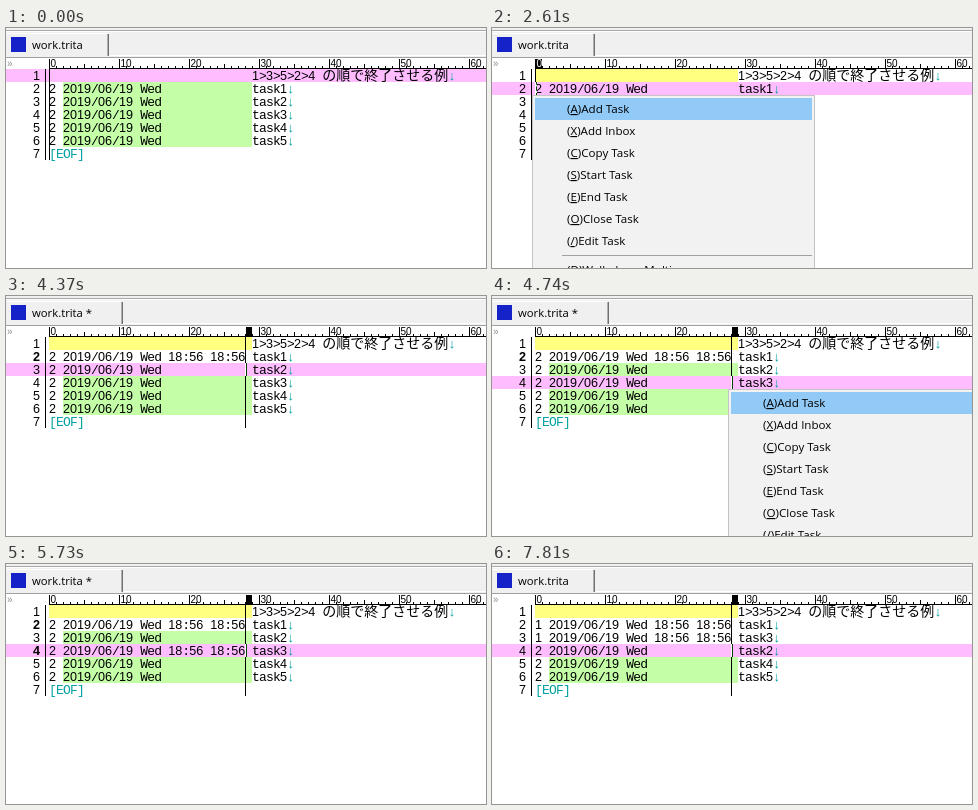
Write an HTML page that moves like this. It is 480 px wide and 240 px high and loops after 8 s.

```html
<!DOCTYPE html>
<html lang="ja">
<head>
<meta charset="utf-8">
<title>work.trita</title>
<style>
html, body { margin: 0; width: 100%; height: 100%; overflow: hidden; background: #fff; }
svg { display: block; width: 480px; height: 240px; }
rect, path { shape-rendering: crispEdges; }
text { white-space: pre; }
.cell { font: 13px "Liberation Mono", monospace; letter-spacing: -0.8px; }
.num { font-family: "Liberation Sans", sans-serif; font-size: 12.6px; letter-spacing: 0; }
.wide { font-family: "Noto Sans CJK JP", "Noto Sans CJK", sans-serif; font-size: 14px; letter-spacing: 0; }
.bold { font-weight: bold; }
.mark { fill: #00a0a0; }
.ui { font: 11.6px "Open Sans", sans-serif; }
.tab { font-size: 11.3px; }
.rule { font: 10px "Liberation Sans", sans-serif; }
.key { text-decoration: underline; }
.caret { mix-blend-mode: difference; }
</style>
</head>
<body>
<svg id="stage" viewBox="0 0 480 240"></svg>
<script>
const LOOP = 8000, LEFT = 43, CELL = 7, TOP = 41, ROW = 13;
const PINK = '#ffbcff', GREEN = '#c4ffa8', YELLOW = '#ffff80';

// task: [name, state, number of times noted]
const task = (id, state = 2, times = 0) => ['task' + id, state, times];
const tasks = (a, b) => [task(1, 2, a), task(2), task(3, 2, b), task(4), task(5)];
const docs = [
  { tasks: tasks(0, 0), edited: [] },
  { tasks: tasks(1, 0), edited: [2] },
  { tasks: tasks(2, 0), edited: [2] },
  { tasks: tasks(2, 1), edited: [2, 4] },
  { tasks: tasks(2, 2), edited: [2, 4] },
  { tasks: [task(1, 1, 2), task(3, 1, 2), task(2), task(4), task(5)], edited: [] }
];

// time, document, row, column
const poses = [
  [0, 0, 1, 0],
  [2360, 0, 2, 0],
  [2980, 1, 2, 22],
  [3870, 2, 2, 28],
  [4370, 2, 3, 28],
  [4490, 2, 4, 28],
  [5110, 3, 4, 22],
  [5730, 4, 4, 28],
  [6750, 5, 4, 28]
];
const FOCUS = 370;
const menuOpen = [[2610, 2860], [3380, 3750], [4740, 4990], [5360, 5730], [6260, 6630]];
const caretOff = [[0, FOCUS], [990, 1490], [1990, 2360], [7310, 7810]];
const within = (spans, t) => spans.some(([a, b]) => t >= a && t < b);

const menuItems = ['A Add Task', 'X Add Inbox', 'C Copy Task', 'S Start Task', 'E End Task',
  'O Close Task', '/ Edit Task', '', 'D Walk down Multi...'];

const esc = s => s.replace(/&/g, '&amp;').replace(/>/g, '&gt;').replace(/</g, '&lt;');
const rect = (x, y, w, h, fill, more = '') =>
  `<rect x="${x}" y="${y}" width="${w}" height="${h}" fill="${fill}" ${more}/>`;
const label = (x, y, body, cls, fill = '#000') =>
  `<text x="${x}" y="${y}" class="${cls}" fill="${fill}">${body}</text>`;
const colX = c => LEFT + c * CELL;
const rowY = r => TOP + (r - 1) * ROW;

// editor text: digits, wide characters and line ends have their own style
function cells(x, row, str, cls = '') {
  const body = str.replace(/\d+|[\u3040-\u9fff]+|↓|[^\d\u3040-\u9fff↓]+/g, s => {
    const kind = /\d/.test(s) ? 'num' : s === '↓' ? 'mark' : /[\u3040-\u9fff]/.test(s) ? 'wide' : '';
    return kind ? `<tspan class="${kind}">${s}</tspan>` : esc(s);
  });
  return label(x, rowY(row) + 11, body, 'cell ' + cls);
}

function header(edited) {
  const w = edited ? 117 : 103;
  return rect(0, 0, 480, 31, '#f0f0f0')
    + rect(0, 2, 480, 1, '#a8a8a8') + rect(0, 3, 480, 1, '#fff')
    + rect(w, 27, 480 - w, 1, '#fff') + rect(0, 29, 480, 1, '#a0a0a0') + rect(0, 30, 480, 1, '#fff')
    + rect(0, 5, w - 1, 1, '#fff') + rect(w - 1, 6, 1, 22, '#707070') + rect(w - 2, 6, 1, 22, '#b0b0b0')
    + rect(5, 9, 15, 15, '#1522c8')
    + label(26, 21, 'work.trita' + (edited ? ' *' : ''), 'ui tab');
}

function ruler(col, marker) {
  let ticks = '', out = label(1, 39, '»', 'rule', '#909090');
  for (let c = 0; colX(c) < 480; c++) {
    const h = c % 10 === 0 ? 10 : c % 5 === 0 ? 5 : 3;
    ticks += `M${colX(c) + 0.5} 41v-${h}`;
    if (c % 10 === 0) out += label(colX(c) + 1.5, 39, c, 'rule');
  }
  out += `<path d="${ticks}" stroke="#000"/>` + rect(LEFT, 40, 480 - LEFT, 1, '#000');
  if (!marker) return out;
  const x = colX(col);
  if (col === 0) return out + rect(x, 31, 7, 10, '#000') + label(x + 1.5, 39, '0', 'rule', '#fff');
  return out + rect(x + 1, 31, 6, 10, '#000') + rect(x, 38, 8, 3, '#000');
}

function editor(doc, row, col, caret) {
  let back = rect(LEFT, rowY(1), 29 * CELL, ROW, YELLOW);
  let text = cells(colX(29), 1, '1>3>5>2>4 の順で終了させる例↓');
  doc.tasks.forEach(([name, state, times], i) => {
    const r = i + 2, cls = times === 1 ? 'bold' : '';
    if (times < 2) back += rect(colX(2), rowY(r), 27 * CELL, ROW, GREEN);
    text += cells(LEFT, r, `${state} 2019/06/19 Wed` + ' 18:56'.repeat(times), cls)
      + cells(colX(29), r, name + '↓', cls);
  });
  text += cells(LEFT, 7, '[EOF]', 'mark');
  for (let r = 1; r <= 7; r++) text += cells(27, r, String(r), doc.edited.includes(r) ? 'bold' : '');
  back += rect(0, rowY(row), 480, ROW, PINK);
  return back + text + rect(39, TOP, 1, 7 * ROW, '#000') + rect(colX(col), TOP, 1, 7 * ROW, '#000')
    + (caret ? rect(colX(col), rowY(row), 2, ROW, '#fff', 'class="caret"') : '');
}

function menu(row, col) {
  const x = colX(col) - 3, top = rowY(row + 1);
  let y = top + 3;
  let out = rect(x, top, 283, 240, '#c4c4c4') + rect(x + 1, top + 1, 281, 240, '#f2f2f2')
    + rect(x + 3, y, 277, 22, '#91c9f7');
  for (const item of menuItems) {
    if (item) {
      out += label(x + 35, y + 15, `(<tspan class="key">${item[0]}</tspan>)${item.slice(2)}`, 'ui');
      y += 22;
    } else {
      out += rect(x + 30, y + 3, 250, 1, '#a0a0a0');
      y += 7;
    }
  }
  return out;
}

const stage = document.getElementById('stage');
const start = performance.now();
let shown = '';

function draw() {
  const t = (performance.now() - start) % LOOP;
  const [, d, row, col] = poses.findLast(p => p[0] <= t);
  const open = within(menuOpen, t), caret = !within(caretOff, t), marker = t >= FOCUS;
  const key = [d, row, col, open, caret, marker].join();
  if (key !== shown) {
    shown = key;
    const doc = docs[d];
    stage.innerHTML = rect(0, 0, 480, 240, '#fff') + header(doc.edited.length > 0)
      + ruler(col, marker) + editor(doc, row, col, caret) + (open ? menu(row, col) : '');
  }
  requestAnimationFrame(draw);
}
draw();
</script>
</body>
</html>
```
